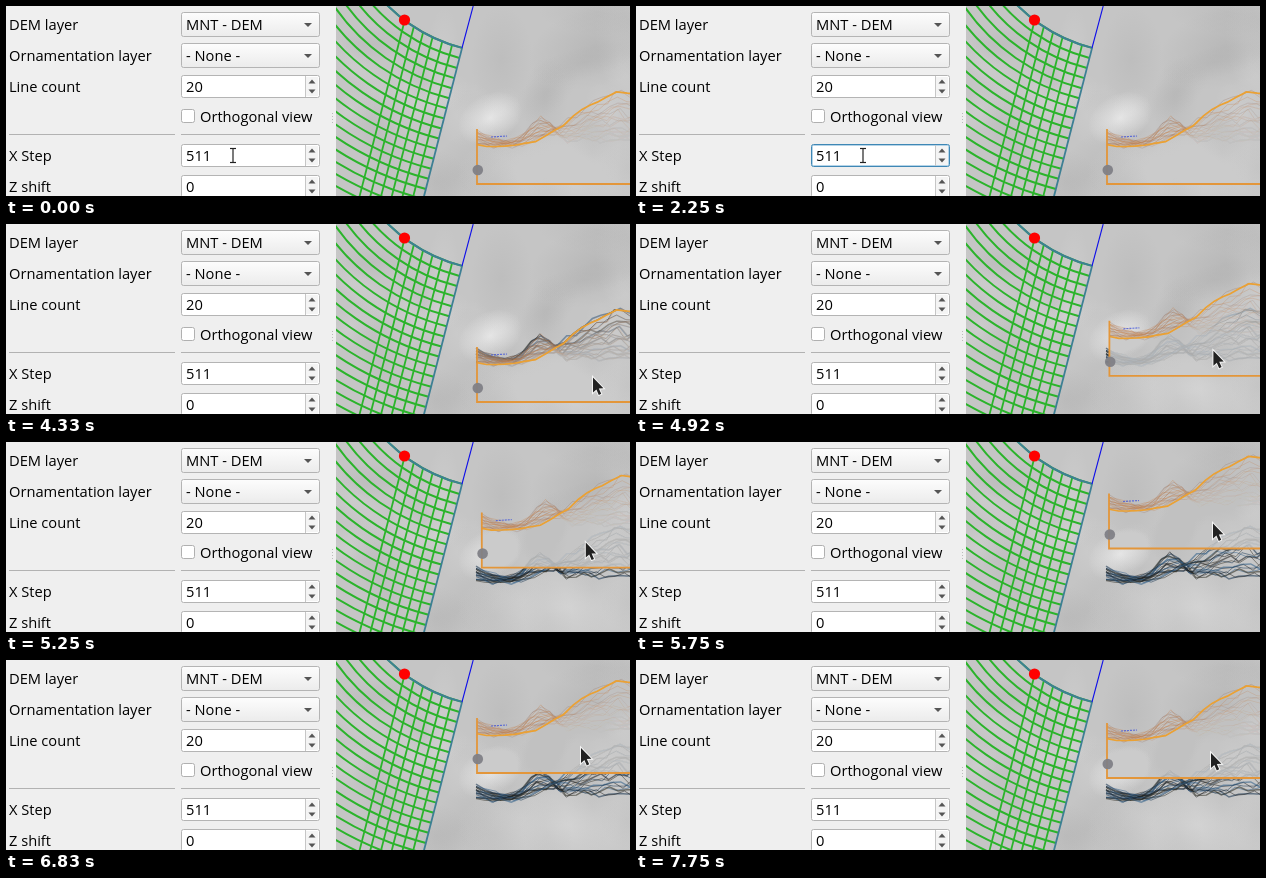
An HTML page with a canvas that plays this animation: 624 by 190 pixels, repeating every 8000 ms.

```html
<!DOCTYPE html>
<html lang="en">
<head>
<meta charset="utf-8">
<title>Profile layout</title>
<style>
html, body { margin: 0; width: 100%; height: 100%; overflow: hidden; background: #efefef; }
canvas { display: block; }
</style>
</head>
<body>
<canvas id="stage" width="624" height="190"></canvas>
<script>
const W = 624, H = 190, LOOP = 8000, STEP = 1000 / 12;
const FONT = '500 14.67px "Open Sans", "Noto Sans", sans-serif';
const ctx = document.getElementById('stage').getContext('2d');

function rng(seed) {
  return () => {
    seed = (seed * 1664525 + 1013904223) % 4294967296;
    return seed / 4294967296;
  };
}

const ramp = (t, a, b) => Math.min(1, Math.max(0, (t - a) / (b - a)));
const hump = (x, at, width) => Math.exp(-(((x - at) / width) ** 2));

function trace(g, pts, dx = 0, dy = 0) {
  g.beginPath();
  for (const [x, y] of pts) g.lineTo(x + dx, y + dy);
}

function stroke(g, pts, color, width = 1, dx = 0, dy = 0) {
  trace(g, pts, dx, dy);
  g.strokeStyle = color;
  g.lineWidth = width;
  g.stroke();
}

function fill(g, pts, color, dx = 0, dy = 0) {
  trace(g, pts, dx, dy);
  g.closePath();
  g.fillStyle = color;
  g.fill();
}

function disc(g, x, y, r, color) {
  g.beginPath();
  g.arc(x, y, r, 0, 7);
  g.fillStyle = color;
  g.fill();
}

function text(g, s, x, y) {
  g.font = FONT;
  g.fillStyle = '#000';
  g.fillText(s, x, y);
}

function box(g, x, y, w, h, top, bottom, border) {
  const shade = g.createLinearGradient(0, y, 0, y + h);
  shade.addColorStop(0, top);
  shade.addColorStop(1, bottom);
  g.beginPath();
  g.roundRect(x + .5, y + .5, w - 1, h - 1, 2);
  g.fillStyle = shade;
  g.fill();
  g.strokeStyle = border;
  g.lineWidth = 1;
  g.stroke();
}

// A negative height points the triangle upwards
function triangle(g, x, y, w, h) {
  fill(g, [[x - w, y - h / 2], [x + w, y - h / 2], [x, y + h / 2]], '#555');
}

function combo(g, y, label) {
  box(g, 175, y, 139, 25, '#fdfdfd', '#ebebeb', '#b4b4b4');
  text(g, label, 180, y + 18);
  triangle(g, 302, y + 13, 4, 4);
}

function spin(g, y, value, focus) {
  box(g, 175, y, 139, 23, '#fff', '#fff', focus ? '#3f87b5' : '#b4b4b4');
  if (focus) {
    g.strokeStyle = 'rgba(90,160,205,.45)';
    g.strokeRect(176.5, y + 1.5, 136, 20);
  }
  g.fillStyle = '#f4f4f4';
  g.fillRect(300, y + 2, 12, 19);
  g.fillStyle = '#c6c6c6';
  g.fillRect(299, y + 1, 1, 21);
  triangle(g, 306, y + 6.5, 3.5, -4);
  triangle(g, 306, y + 16.5, 3.5, 4);
  text(g, value, 180, y + 17);
}

function panel(g) {
  g.fillStyle = '#efefef';
  g.fillRect(0, 0, 330, H);
  const rows = ['DEM layer', 'Ornamentation layer', 'Line count'];
  rows.forEach((s, i) => text(g, s, 3, 24 + i * 31));
  text(g, 'X Step', 3, 155);
  text(g, 'Z shift', 3, 186);
  combo(g, 6, 'MNT - DEM');
  combo(g, 37, '- None -');
  spin(g, 69, '20');
  spin(g, 169, '0');
  box(g, 175, 103, 14, 14, '#fff', '#fff', '#b0b0b0');
  text(g, 'Orthogonal view', 194, 116);
  g.fillStyle = '#b2b2b2';
  g.fillRect(3, 128, 166, 1);
  g.fillRect(175, 128, 139, 1);
  g.fillStyle = '#bcbcbc';
  for (let y = 107; y < 118; y += 3) g.fillRect(326, y, 1, 1);
}

function blob(g, x, y, rx, ry, turn, tone, alpha) {
  g.save();
  g.translate(x, y);
  g.rotate(turn);
  g.scale(rx, ry);
  const glow = g.createRadialGradient(0, 0, 0, 0, 0, 1);
  glow.addColorStop(0, `rgba(${tone},${tone},${tone},${alpha})`);
  glow.addColorStop(1, `rgba(${tone},${tone},${tone},0)`);
  g.fillStyle = glow;
  g.fillRect(-1, -1, 2, 2);
  g.restore();
}

function map(g) {
  g.save();
  g.beginPath();
  g.rect(330, 0, W - 330, H);
  g.clip();
  g.fillStyle = '#c5c5c5';
  g.fillRect(330, 0, W - 330, H);
  const rand = rng(12);
  for (let i = 0; i < 24; i++) {
    blob(g, 340 + rand() * 284, rand() * H, 25 + rand() * 45, 15 + rand() * 22,
      rand() * 3, rand() < .55 ? 232 : 160, .2);
  }
  blob(g, 484, 112, 34, 24, -.5, 240, .75);
  blob(g, 560, 165, 110, 45, 0, 228, .45);
  blob(g, 590, 40, 70, 40, -.3, 160, .35);
  grid(g);
  g.restore();
}

// Concentric arcs, crossed by lines parallel to the straight right edge
function grid(g) {
  const cx = 496.6, cy = -116, r0 = 163, edge = 1.822, green = '#2bb42b', rim = '#3d7f94';
  const ux = Math.cos(edge), uy = Math.sin(edge);
  const arc = (r, color) => {
    g.beginPath();
    g.arc(cx, cy, r, edge, 3.3);
    g.strokeStyle = color;
    g.lineWidth = 2;
    g.stroke();
  };
  const rail = (off, color) => {
    const at = d => [cx + ux * d - uy * off, cy + uy * d + ux * off];
    stroke(g, [at(Math.sqrt(r0 * r0 - off * off)), at(420)], color, 1.8);
  };
  for (let i = 0; i < 27; i++) arc(r0 + i * 10.4, green);
  for (let i = 1; i < 7; i++) rail(i * 10.4, green);
  arc(r0, rim);
  rail(0, rim);
  stroke(g, [[467.2, 0], [456, 42]], '#1010e8', 1.1);
  disc(g, 398.5, 14, 5.6, '#f00');
}

// Terrain height above the frame's base; v runs from back (0) to front (1)
function height(x, v) {
  const slope = 1 / (1 + Math.exp((92 - x) / 17));
  return 36 + 3 * Math.exp(-x / 12) + 14 * (1 - v) * Math.exp(-x / 40)
    + 26 * (1 - v) * hump(x, 64, 18) + (9 + 47 * v ** 1.2) * slope + 5 * v * hump(x, 137, 8);
}

const COUNT = 20, SPAN = 168;

function makeProfiles() {
  const rand = rng(77);
  return Array.from({ length: COUNT }, (_, k) => {
    const v = k / (COUNT - 1), rough = v < 1 ? 4 : 1, pts = [];
    for (let x = 0; x < SPAN + 9; x += 7 + rand() * 4) {
      pts.push([x, -height(x, v) + (rand() - .5) * rough * (1 + x / 70)]);
    }
    return pts;
  });
}
const profiles = makeProfiles();

function shadowLines(g) {
  const tints = ['#14324f', '#1c1c1c', '#2f5d88', '#2b2a20'];
  g.globalAlpha = .55;
  profiles.forEach((p, k) => stroke(g, p, tints[k % 4], k % 3 ? .9 : 1.5, 470, 178));
  g.globalAlpha = 1;
}

function frame(g, x, y) {
  profiles.forEach((p, k) => {
    fill(g, [...p, [SPAN, 0], [0, 0]], 'rgba(198,197,196,.085)', x, y);
    const tint = k % 3 ? '196,120,62' : '150,112,96';
    if (k < COUNT - 1) stroke(g, p, `rgba(${tint},.36)`, .8, x, y);
  });
  g.setLineDash([2, 1]);
  stroke(g, [[14, -47], [30, -48]], 'rgba(60,80,220,.75)', 1.2, x, y);
  g.setLineDash([]);
  stroke(g, profiles[COUNT - 1], '#eba133', 1.7, x, y);
  stroke(g, [[0, -55], [0, 0], [SPAN, 0]], '#e3963a', 1.8, x, y);
  disc(g, x + .8, y - 14, 5.3, 'rgba(128,128,134,.95)');
}

function pointer(g, x, y) {
  const pts = [[0, 0], [0, 15], [3.4, 12], [5.8, 17.4], [8.2, 16.3], [5.8, 11], [10.4, 10.8]];
  trace(g, pts, x, y);
  g.closePath();
  g.strokeStyle = '#f4f4f4';
  g.lineWidth = 2;
  g.stroke();
  fill(g, pts, '#222', x, y);
}

function beam(g) {
  const bars = [[[227, 143], [227, 156]], [[224, 142.5], [230, 142.5]], [[224, 156.5], [230, 156.5]]];
  bars.forEach(p => stroke(g, p, 'rgba(255,255,255,.9)', 3));
  bars.forEach(p => stroke(g, p, '#222', 1.2));
}

// Straight moves: [from, to, dx, dy]
const APPROACH = [[3917, 4000, -1, -18], [4167, 4500, -24, -1]];
const DRAG = [[4583, 5417, 6, -65.5], [5417, 5917, -6, -9], [6000, 6333, -2.5, -2],
  [6667, 6833, 2.5, 11.5], [6833, 7000, 0, 6.5], [7583, 7750, 0, -1.5]];

function travel(moves, t) {
  return moves.reduce(([x, y], [a, b, dx, dy]) => {
    const u = ramp(t, a, b);
    return [x + dx * u, y + dy * u];
  }, [0, 0]);
}

const backdrop = document.createElement('canvas');
backdrop.width = W;
backdrop.height = H;
const back = backdrop.getContext('2d');
map(back);
panel(back);

function draw(t) {
  const q = Math.floor((t + 5) / STEP) * STEP;
  const within = (a, b) => t >= a && t < b;
  const entered = t >= 3920;
  ctx.drawImage(backdrop, 0, 0);
  spin(ctx, 138, '511', within(330, 3580));
  if (within(330, 920) || within(1500, 2250) || within(2830, 3420)) {
    ctx.fillStyle = '#111';
    ctx.fillRect(205, 141, 1, 17);
  }
  if (t < 2500) beam(ctx);

  const [dx, dy] = travel(DRAG, q);
  if (entered) shadowLines(ctx);
  frame(ctx, 471 + dx, 178 + dy);
  if (entered) {
    const [ax, ay] = travel(APPROACH, q);
    pointer(ctx, 600 + ax + dx, 172 + ay + dy);
  }
}

const start = performance.now();
function tick() {
  draw((performance.now() - start) % LOOP);
  requestAnimationFrame(tick);
}
tick();
</script>
</body>
</html>
```
